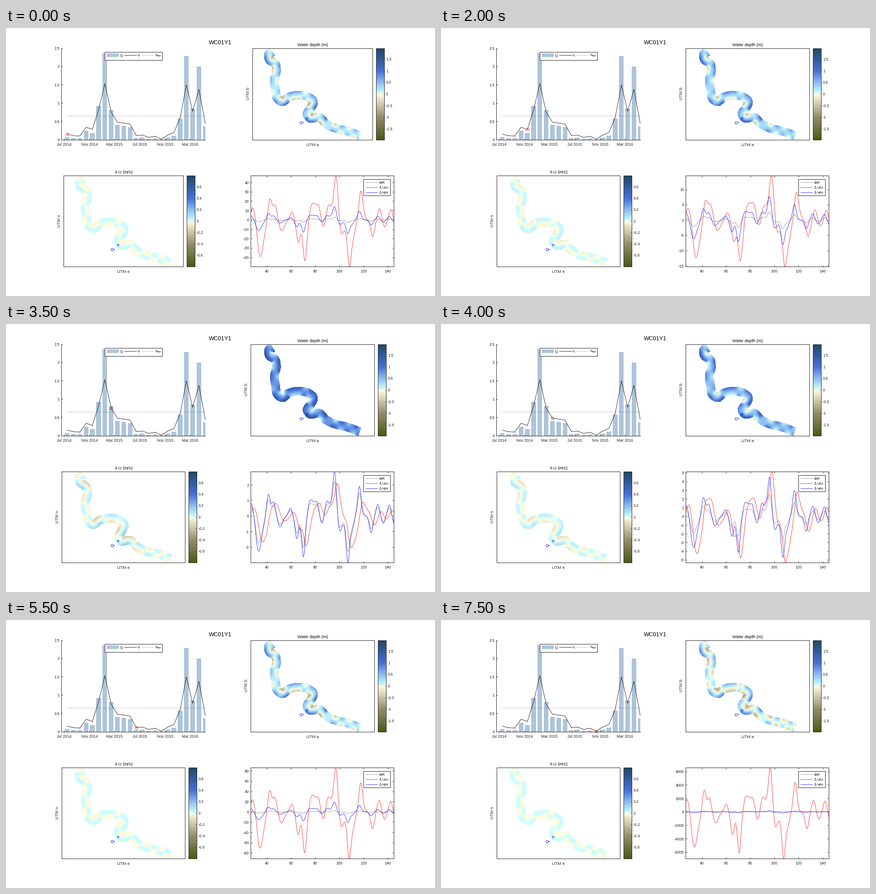
Write a matplotlib script that moves like this. It is 947 px wide and 592 px high and loops after 8 s.

```python
import numpy as np
import matplotlib.pyplot as plt
from matplotlib.animation import FuncAnimation
from matplotlib.colors import LinearSegmentedColormap
from matplotlib.patches import Rectangle

W, H, DPI = 947, 592, 64
PX = 72 / DPI                      # one pixel in points
INK = "#262626"
BAR = "#adc4da"
DOTS = dict(color="#303030", lw=.8 * PX, dashes=(1.2, 2.4))
FRAMES, INTERVAL = 16, 500

plt.rcParams.update({
    "font.family": "Liberation Sans",
    "font.size": 8.55 * PX,
    "axes.linewidth": PX,
    "axes.edgecolor": INK,
    "xtick.color": INK,
    "ytick.color": INK,
    "mathtext.fontset": "custom",
    "mathtext.rm": "Liberation Serif",
    "mathtext.sf": "Liberation Sans",
})
DELTA = r"$\mathrm{\Delta}$"

# Monthly water level; discharge follows a power-law rating curve
LEVEL = np.array([.151, .107, .1, .34, .278, .817, 1.535, .749, .476, .452,
                  .427, .111, .124, .062, .093, .0125, .124, .192, .6, 1.497,
                  .773, 1.374, .44])
DISCHARGE = 1.245 * LEVEL**1.5
DAYS = 15 + 30.37 * np.arange(len(LEVEL))
BANKFULL = .656

# Channel curvature: one bump (position, strength) per bend
S0, S1, DS = 26.7, 145.15, .1
BENDS = np.array([
    (27, .7), (32, -1.35), (34.3, -1.35), (37, -.5), (41.3, 1.22), (45.5, .78),
    (50.5, -.56), (53, -.25), (59.5, .43), (64.8, -1.3), (70.2, -2.35),
    (75.5, .75), (78.3, .65), (81.5, .75), (85.5, -.45), (89.6, .8),
    (92.8, .5), (96, 2.5), (100.3, -.85), (103.3, -.3), (107, -2.6),
    (110.5, -.75), (116.6, 1.68), (126.3, -.97), (131.8, .66), (136.2, -.43),
    (141.4, .63), (145.3, -.45)])
S = np.arange(18, S1 + DS, DS)
CURV = np.exp(-((S[:, None] - BENDS[:, 0]) / 2.1) ** 2) @ BENDS[:, 1]
CURV /= CURV.max()

# River centreline through a few stage points, upstream to downstream
COURSE = np.array([
    (589, 52), (580, 58), (581, 68), (595, 80), (597, 94), (592.5, 115),
    (595, 135), (600, 156), (610, 162.5), (623, 153.5), (642, 148.5),
    (668, 153), (678.5, 163), (672, 178), (665, 190), (671, 198.5),
    (691, 197), (706, 211), (725, 220.5), (755, 228), (781, 238)])
HALF_WIDTH = 9.7


def hermite(x, xp, yp):
    """Cubic interpolation with finite-difference slopes."""
    m = np.gradient(yp, xp)
    i = np.clip(np.searchsorted(xp, x, side="right") - 1, 0, len(xp) - 2)
    d = xp[i + 1] - xp[i]
    t = (x - xp[i]) / d
    return ((2 * t**3 - 3 * t**2 + 1) * yp[i] + (t**3 - 2 * t**2 + t) * d * m[i]
            + (3 * t**2 - 2 * t**3) * yp[i + 1] + (t**3 - t**2) * d * m[i + 1])


def channel(rows=420, cols=24):
    """Grid corners on the stage, and s and n at the cell centres."""
    chord = np.r_[0, np.cumsum(np.hypot(*np.diff(COURSE, axis=0).T))]
    d = np.linspace(0, chord[-1], rows + 1)
    x, y = (hermite(d, chord, COURSE[:, k]) for k in (0, 1))
    arc = np.r_[0, np.cumsum(np.hypot(np.diff(x), np.diff(y)))]
    dx, dy = np.gradient(x, d), np.gradient(y, d)
    norm = np.hypot(dx, dy)
    n = np.linspace(-1, 1, cols + 1)
    gx = x[:, None] + HALF_WIDTH * n * (dy / norm)[:, None]
    gy = y[:, None] - HALF_WIDTH * n * (dx / norm)[:, None]
    s = S0 + (S1 - S0) * arc / arc[-1]
    return gx, gy, (s[1:] + s[:-1]) / 2, (n[1:] + n[:-1]) / 2


GX, GY, S_CELL, N_CELL = channel()


def velocity(h):
    """Curvature relaxed over a length that grows with depth."""
    keep = np.exp(-DS / (5 * h))
    u = np.empty_like(CURV)
    acc = CURV[0]
    for i, c in enumerate(CURV):
        acc = acc * keep + c * (1 - keep)
        u[i] = acc
    return np.interp(S - .6 - .4 * h, S, u)


def across(values):
    """Linear cross slope over the channel, levelling off in sharp bends."""
    return np.outer(np.tanh(1.87 * np.interp(S_CELL, S, values)), N_CELL)


CMAP = LinearSegmentedColormap.from_list("depth", [
    (0, "#4a5a14"), (.25, "#968e6c"), (.5, "#fffde1"),
    (.5, "#d0ffff"), (.625, "#8cbef1"), (.75, "#4670d7"), (1, "#204864")],
    N=512)

fig = plt.figure(figsize=(W / DPI, H / DPI), dpi=DPI, facecolor="white")


def place(ax, x0, y0, x1, y1, nudge=.1):
    # the nudge keeps half-pixel edges from snapping to the next pixel
    ax.set_position([(x0 - nudge) / W, 1 - (y1 + nudge) / H,
                     (x1 - x0) / W, (y1 - y0) / H])


def panel(*box):
    ax = fig.add_axes([0, 0, 1, 1])
    ax.patch.set_visible(False)
    place(ax, *box)
    ax.tick_params(direction="in", length=3.2 * PX, width=PX)
    ax.tick_params(axis="x", pad=6 * PX)
    ax.tick_params(axis="y", pad=4 * PX)
    return ax


def set_yticks(ax, ticks):
    ax.set_yticks(ticks, [f"{v:g}" for v in ticks])


def ring(ax, x, y, size, color, **kw):
    return ax.plot(x, y, "o", mfc="none", mec=color, ms=size * PX,
                   mew=.85 * PX, **kw)[0]


# Hydrograph
hydro = panel(122.5, 44.5, 440.5, 246.5)
hydro.spines[["top", "right"]].set_visible(False)
hydro.bar(DAYS, DISCHARGE, width=22.5, color=BAR)
hydro.plot(DAYS, LEVEL, color="black", lw=.8 * PX)
hydro.plot(DAYS[[0, -1]], [BANKFULL] * 2, **DOTS)
past, = hydro.plot([], [], ".", color="red", ms=2.6 * PX, mew=0)
now = ring(hydro, [], [], 5.6, "red", clip_on=False)
set_yticks(hydro, np.arange(6) * .5)
starts = np.arange("2014-07", "2016-04", 4, dtype="datetime64[M]")
names = {"03": "Mar", "07": "Jul", "11": "Nov"}
hydro.set_xticks(
    (starts.astype("datetime64[D]") - np.datetime64("2014-07-01")).astype(int),
    [f"{names[m]} {y}" for y, m in (str(d).split("-") for d in starts)])
hydro.set(xlim=(-13.2, 684.5), ylim=(0, 2.5))


# River maps with colour bars
def river_map(dx, dy, lim, step):
    ax, bar = panel(0, 0, 10, 10), panel(0, 0, 10, 10)
    ax.set(xticks=[], yticks=[])
    mesh = ax.pcolormesh(GX + dx, GY + dy, np.zeros((len(S_CELL), len(N_CELL))),
                         cmap=CMAP, vmin=-lim, vmax=lim)
    ring(ax, 651.5 + dx, 208.5 + dy, 5.4, "blue")
    ring(ax, 664.5 + dx, 198.5 + dy, 3.8, "blue")
    ax.plot(656 + dx, 208.3 + dy, "o", color="blue", ms=2 * PX, mew=0)
    bar.imshow(np.linspace(lim, -lim, 404)[:, None], cmap=CMAP, aspect="auto",
               extent=(0, 1, -lim, lim), vmin=-lim, vmax=lim)
    bar.set_xticks([])
    bar.yaxis.tick_right()
    bar.tick_params(axis="y", length=2.5 * PX, pad=3.5 * PX)
    set_yticks(bar, np.arange(-3, 4) * step)
    return ax, bar, mesh


depth_ax, depth_bar, depth_mesh = river_map(0, 0, 1.965, .5)
speed_ax, speed_bar, speed_mesh = river_map(-417.5, 280.5, .8, .2)

# Relative changes along the channel
profile = panel(540.5, 325.5, 856.5, 526.5)
profile.tick_params(top=True, right=True)
profile.set_xticks(np.arange(40, 141, 20))
profile.set_xlim(S0, S1)
STYLES = {"B/R": "#808080", DELTA + " U/U": "red", DELTA + " H/H": "blue"}
curves = [profile.plot([], [], color=c, lw=.75 * PX)[0]
          for c in STYLES.values()]

# Titles and legends in stage pixels
stage = fig.add_axes([0, 0, 1, 1], zorder=10)
place(stage, 0, 0, W, H)
stage.set(xlim=(0, W), ylim=(H, 0))
stage.axis("off")


def text(x, y, s, size=9.4, **kw):
    kw = {"ha": "center", "va": "baseline", "color": "black", **kw}
    return stage.text(x, y, s, fontsize=size * PX, **kw)


def side_label(y, s):
    return text(0, y, s, rotation=90, va="center", color=INK)


def legend_box(x0, y0, x1, y1):
    stage.add_patch(Rectangle((x0, y0), x1 - x0, y1 - y0, fc="white", ec=INK,
                              lw=PX))


def legend_entry(x, y, name, gap=3, **line):
    if line:
        stage.plot([x - gap - 26.5, x - gap], [y, y], **line)
    text(x, y + 2.9, name, 7.7, ha="left")


text(473, 35.4, "WC01Y1", 12.5)
text(677, 40.3, "Water depth (m)")
text(259.5, 320.5, DELTA + " U (m/s)")
text(677, 261, "UTM e", color=INK)
text(259.5, 541, "UTM e", color=INK)
depth_label = side_label(145, "UTM b")
speed_label = side_label(425.5, "UTM n")

legend_box(218.5, 52.5, 345.5, 70.5)
stage.add_patch(Rectangle((223, 55.5), 26, 8.5, fc=BAR, ec="none"))
legend_entry(252, 60, "Q")
legend_entry(291, 60, "h", color="black", lw=.8 * PX)
legend_entry(329.5, 59.5, r"h$_{\mathsf{bkf}}$", **DOTS)

legend_box(789.5, 333.5, 848.5, 369.5)
for k, (name, color) in enumerate(STYLES.items()):
    legend_entry(823.5, 341.2 + 10.8 * k, name, color=color, lw=.75 * PX)


def nice_ticks(lo, hi):
    base = 10.0 ** np.floor(np.log10((hi - lo) / 11.5))
    step = next(base * k for k in (1, 2, 5, 10) if (hi - lo) / (base * k) <= 11.5)
    return np.arange(np.ceil(lo / step), np.floor(hi / step) + 1) * step


def layout(grow):
    """Place both maps, their boxes widened by `grow` on each side."""
    for ax, bar, label, x0, x1, y0, y1 in [
            (depth_ax, depth_bar, depth_label, 544.5, 809.5, 44.5, 246.5),
            (speed_ax, speed_bar, speed_label, 127.5, 391.5, 325.5, 526.5)]:
        x0, x1 = x0 - grow, x1 + grow
        place(ax, x0, y0, x1, y1)
        ax.set(xlim=(x0, x1), ylim=(y1, y0))
        place(bar, x1 + 8, y0, x1 + 26, y1)
        label.set_x(x0 - 9.7)


def draw(k):
    h = LEVEL[k]
    layout(4 if k else 0)
    past.set_data(DAYS[:k], LEVEL[:k])
    now.set_data([DAYS[k]], [h])

    u = velocity(h)
    depth_mesh.set_array(h + 1.05 * across(CURV))
    speed_mesh.set_array(.35 * h**1.3 * across(u))

    shown = (S >= S0) & (S <= S1)
    peak_u = (1.03 + .14 * min(h / .4, 1)) / h**2
    series = [CURV * (2.9 - .94 * h),
              u / u[shown].max() * peak_u,
              CURV * 2.14 / h]
    for line, y in zip(curves, series):
        line.set_data(S, y)
    lo = min(y[shown].min() for y in series)
    hi = max(y[shown].max() for y in series)
    set_yticks(profile, nice_ticks(lo, hi))
    profile.set_ylim(lo, hi)
    return []


anim = FuncAnimation(fig, draw, frames=FRAMES, interval=INTERVAL,
                     repeat=True, repeat_delay=0, blit=False)
plt.show()
```
